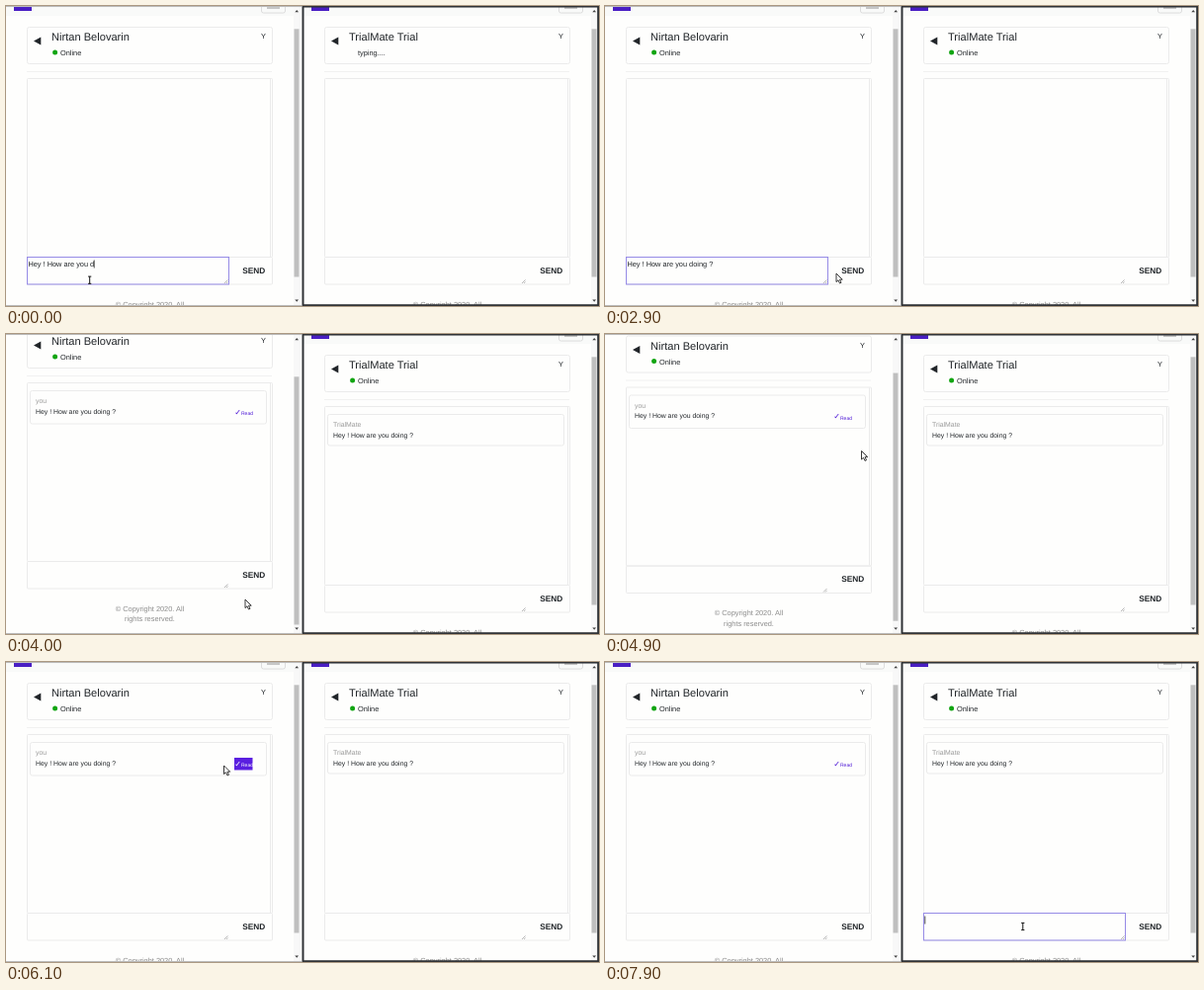
Write an HTML page that moves like this. It is 600 px wide and 304 px high and loops after 8000 ms.

```html
<!DOCTYPE html>
<html lang="en">
<head>
<meta charset="utf-8">
<title>Chat</title>
<style>
  html, body { margin: 0; width: 100%; height: 100%; overflow: hidden; background: #fefefd; }
  #stage { display: block; width: 600px; height: 304px; font: 7.38px "Liberation Sans", Arial, sans-serif; fill: #212529; }
  text { white-space: pre; text-rendering: geometricPrecision; }
  .name { font-size: 11.1px; }
  .msg { font-size: 6.88px; }
  .send { font-size: 8.3px; font-weight: bold; }
  .muted { fill: #8b8b8b; }
  .line { fill: none; stroke: #ebebeb; }
  .tick { font: 8px "DejaVu Sans", sans-serif; }
  .read { font-size: 5px; }
</style>
</head>
<body>
<svg id="stage" viewBox="0 0 600 304"></svg>
<script>
const LOOP = 8000, STEP = 100;
const MESSAGE = "Hey ! How are you doing ?";
const PURPLE = "#4a1fc4";
const $ = id => document.getElementById(id);

const box = (x, y, w, h, r = 2) =>
  `<rect class="line" x="${x}" y="${y}" width="${w}" height="${h}" rx="${r}"/>`;
const label = (x, y, text, cls = "", extra = "") =>
  `<text x="${x}" y="${y}" class="${cls}" ${extra}>${text}</text>`;

// One chat window; ids are prefixed with the side letter.
function pane(side, x, name, sender, cardHeight) {
  return `<svg x="${x}" y="1" width="298" height="302" viewBox="0 1 298 302">
    <g id="${side}Page">
      <rect y="-20" width="291" height="30" fill="#f9faf9"/>
      <rect x="8" y="-13" width="18" height="18" fill="${PURPLE}"/>
      <rect x="258.5" y="-10.5" width="24" height="17.5" rx="2" fill="none" stroke="#dcdcdc"/>
      <path d="M264 2h13" stroke="#959595"/>
      <rect x="21.5" y="21.5" width="248" height="37" rx="2" fill="#fefefd" stroke="#ebebeb"/>
      <path d="M28 35.4l7.3-4v8z"/>
      ${label(46, 35.3, name, "name")}
      ${label(258, 33, "Y")}
      <circle id="${side}Dot" cx="49.6" cy="47" r="2.5" fill="#12a512"/>
      <text id="${side}Status" x="55" y="50"></text>
      <path d="M21 66.5h248" stroke="#f1f1f1"/>
      ${box(21.5, 73.5, 248, 181, 1)}
      <path class="line" d="M267.5 74v180"/>
      <g id="${side}Message">
        ${box(24.5, 81.5, 239, cardHeight)}
        ${label(30, 94.4, sender, "msg", 'fill="#999"')}
        ${label(30, 104.6, MESSAGE, "msg")}
      </g>
      ${box(21.5, 254.5, 248, 27.5, 1)}
      <rect id="${side}Focus" x="21.5" y="254.5" width="204" height="27.5" fill="none" stroke="#968be6"/>
      <path d="M221 281l3.5-3.5M223 281l1.5-1.5" stroke="#999" stroke-width=".7"/>
      <text id="${side}Input" x="22.4" y="263.6"></text>
      <path id="${side}Caret" d="M0 257.5v8" stroke="#222" stroke-width=".8"/>
      ${label(239.2, 270.6, "SEND", "send")}
      ${label(145.5, 304.6, "© Copyright 2020. All", "muted", 'text-anchor="middle"')}
      ${label(145.5, 315.4, "rights reserved.", "muted", 'text-anchor="middle"')}
    </g>
    <rect x="291" y="1" width="7" height="302" fill="#f8f8f8"/>
    <rect id="${side}Thumb" x="291.5" y="23.3" width="5" height="251.2" fill="#bfbfbf"/>
    <path d="M292.3 6.2l1.9-2.2 1.9 2.2zM292.3 297.5l1.9 2.2 1.9-2.2z" fill="#444"/>
  </svg>`;
}

$("stage").innerHTML = `
  <rect width="600" height="304" fill="#fefefd"/>
  ${pane("l", 0, "Nirtan Belovarin", "you", 33.5)}
  ${pane("r", 301, "TrialMate Trial", "TrialMate", 31.5)}
  <path d="M0 .5h299M0 303.5h299" stroke="#bcbcbc"/>
  <path d="M300.5 .5H599.2V303.2H300.5Z" fill="none" stroke="#2f3236" stroke-width="2"/>
  <path id="arrow" d="M0 0v8.6l2-1.8 1.5 3.2 1.5-.7-1.5-3.1h2.7z" fill="#fff" stroke="#222" stroke-width=".9"/>
  <path id="beam" d="M-1.6-3.6h3.2M0-3.6v7.2M-1.6 3.6h3.2" fill="none" stroke="#111"/>`;

$("lMessage").insertAdjacentHTML("beforeend", `<g id="receipt">
  <rect id="mark" x="231" y="97" width="18.5" height="12.5" fill="#5a1fe0"/>
  ${label(231.3, 105.5, "✓", "tick")}${label(238, 106, "Read", "read")}</g>`);

// Eased interpolation through keys of the form [time, ...values].
function track(keys, t) {
  const next = keys.findIndex(key => key[0] > t);
  if (next === 0) return keys[0].slice(1);
  if (next < 0) return keys.at(-1).slice(1);
  const a = keys[next - 1], b = keys[next];
  const u = (t - a[0]) / (b[0] - a[0]), e = u * u * (3 - 2 * u);
  return a.slice(1).map((v, i) => v + (b[i + 1] - v) * e);
}

const pointerPath = [
  [2200, 84.7, 277.7], [2900, 234, 271], [3100, 242, 269], [4200, 242, 269],
  [4800, 259.5, 118.5], [5100, 259.5, 118.5], [5500, 251, 104], [6000, 220.5, 105],
  [6300, 220.5, 105], [6900, 330, 127], [7700, 422.8, 268]
];
const scrollPath = [[3500, 0], [3900, 24], [4800, 24], [5160, 0]];
const keyTimes = [100, 300, 500, 700, 900, 1800];
const typedBefore = MESSAGE.indexOf("d") + 1;

const show = (id, on) => $(id).setAttribute("visibility", on ? "inherit" : "hidden");
const move = (id, x, y) => $(id).setAttribute("transform", `translate(${x} ${y})`);
const during = (t, from, to) => t >= from && t < to;

function render(t) {
  const sent = t >= 3500, replying = t >= 7900;
  const typed = MESSAGE.slice(0, typedBefore + keyTimes.filter(k => k <= t).length);
  $("lInput").textContent = sent ? "" : typed;
  const width = sent ? 0 : $("lInput").getComputedTextLength();
  move("lCaret", 22.4 + width, 0);
  move("rCaret", 22.8, 0);
  show("lCaret", t < 1300 || during(t, 1800, 2300));
  show("rCaret", replying);
  show("lFocus", !sent);
  show("rFocus", replying);

  const typing = t < 2600;
  $("lStatus").textContent = "Online";
  $("rStatus").textContent = typing ? "typing...." : "Online";
  show("rDot", !typing);

  show("lMessage", sent);
  show("rMessage", t >= 3600);
  show("receipt", t >= 3700);
  const selected = during(t, 5900, 6400);
  show("mark", selected);
  $("receipt").setAttribute("fill", selected ? "#fff" : "#4d17d6");

  const [scroll] = track(scrollPath, t);
  move("lPage", 0, -scroll);
  move("lThumb", 0, scroll * 20 / 24);

  const [x, y] = track(pointerPath, t);
  const overInput = y > 254 && (during(x, 21, 225) || during(x, 322, 526));
  show("beam", overInput);
  show("arrow", !overInput);
  move("beam", x, y);
  move("arrow", x, y);
}

function tick() {
  render(Math.floor(performance.now() % LOOP / STEP) * STEP);
  requestAnimationFrame(tick);
}
tick();
</script>
</body>
</html>
```
